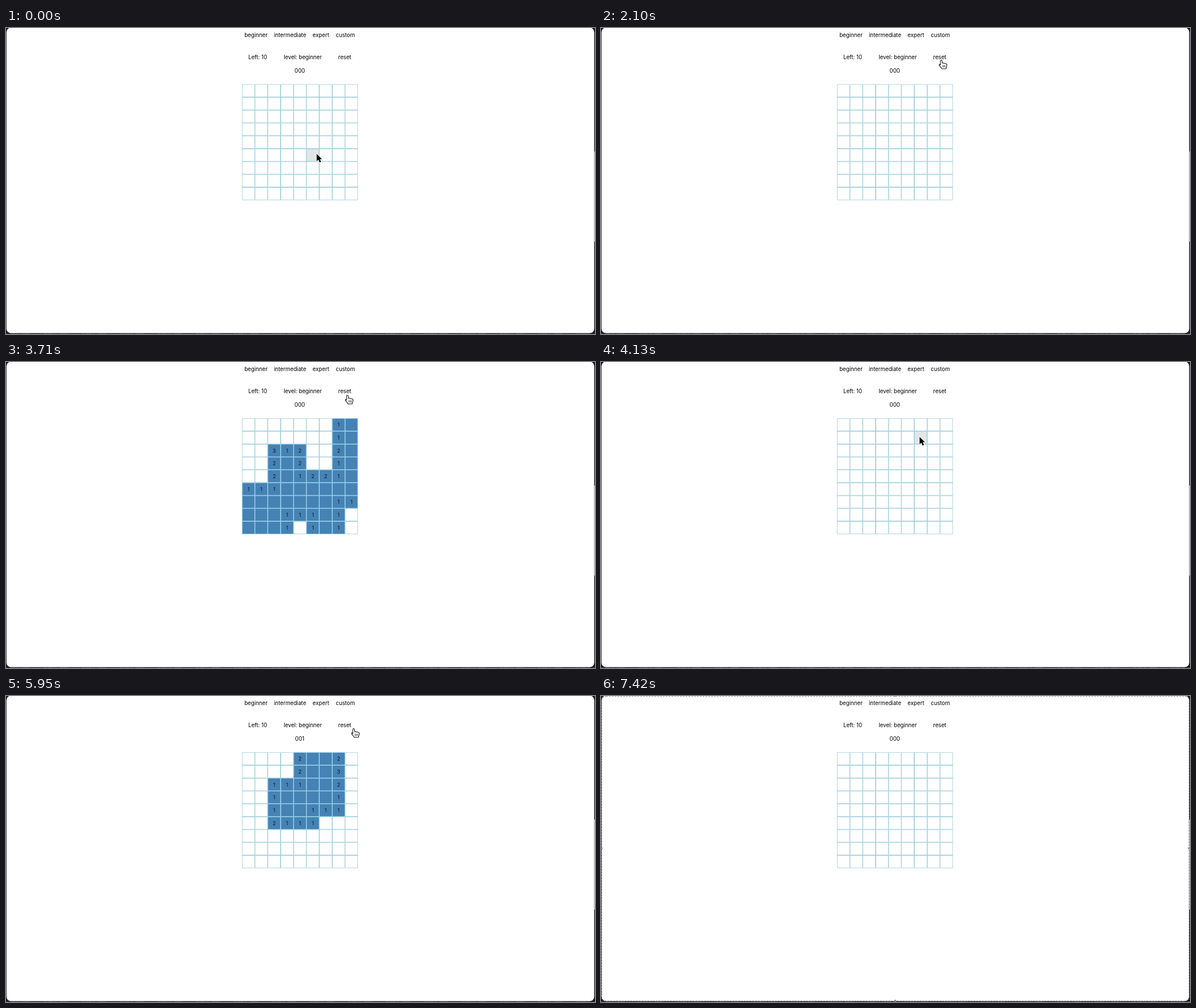
Recreate the animation shown at these times as an HTML page. Size 1038 by 540 pixels, loop 7560 ms.

```html
<!DOCTYPE html>
<html lang="en">
<head>
<meta charset="utf-8">
<title>Minesweeper</title>
<style>
  html, body { margin: 0; width: 100%; height: 100%; overflow: hidden; background: #1d1d22; }
  svg { display: block; width: 1038px; height: 540px; }
  text { font: 9.7px Inter, "Open Sans", sans-serif; text-anchor: middle; fill: #000; }
  #digits text { font-size: 9px; fill: #0c1a26; }
  #cells rect { fill: #fff; stroke: #9bcad9; stroke-width: .8; }
  #cells .hover { fill: #e2e6e6; }
  #cells .open { fill: #4682b4; stroke: #87c9e8; }
</style>
</head>
<body>
<svg viewBox="0 0 1038 540">
  <rect width="1038" height="540" fill="#1d1d22"/>
  <path d="M1037.4 218V377" stroke="#c9c9cb" stroke-width="1.2"/>
  <path d="M0 539.6H1038" stroke="#77777c" stroke-width=".7" stroke-dasharray="5 2 9 3 3 6 14 25" opacity=".5"/>
  <rect x=".9" y="-.6" width="1035.7" height="539.2" rx="8" fill="#fff"/>
  <g id="selection" fill="none">
    <rect x="1.2" y=".2" width="1035.2" height="538.1" rx="8" stroke="#66666c" stroke-dasharray="3 2"/>
    <g fill="#8b8b90">
      <circle cx="518.5" cy="-.6" r="2"/><circle cx="518.5" cy="538" r="2"/>
      <circle cx="1.2" cy="268.5" r="1.6"/><circle cx="1036" cy="268.5" r="1.6"/>
    </g>
  </g>
  <text x="440.5" y="15.6">beginner</text>
  <text x="500.5" y="15.6">intermediate</text>
  <text x="555" y="15.6">expert</text>
  <text x="598" y="15.6">custom</text>
  <text x="443.5" y="54.8">Left: 10</text>
  <text x="523" y="54.8">level: beginner</text>
  <text x="597" y="54.8">reset</text>
  <text id="timer" x="517.7" y="78.9">000</text>
  <g id="cells"></g>
  <g id="digits"></g>
  <g id="arrow" stroke-linejoin="round">
    <path d="M0 0V13L3 10.4L5.2 15.2L7.7 14.1L5.6 9.4H9.4Z" fill="#000" stroke="#fff" stroke-width="1.6" paint-order="stroke"/>
  </g>
  <g id="hand" stroke="#111" stroke-linejoin="round" stroke-linecap="round">
    <path d="M-.8 8.4V1.2Q-.8-.5.6-.5Q2-.5 2.2 1.2L2.7 5.2Q4.3 4.3 5.5 5.4Q7 4.8 8.1 6Q10.2 5.6 10.6 7.6L10 11.6L8.9 15H1.6L.4 12.8L-2.7 9.2Q-3.5 6.9-2.1 7.1Q-1.3 7.3-.8 8.4Z" fill="#fff" stroke-width="1.1"/>
    <path d="M3.2 8.8V12.2M5.3 8.8V12.2M7.4 8.8V12.2" stroke-width=".8" fill="none"/>
  </g>
</svg>
<script>
const LOOP = 7560, STEP = 70, SIZE = 9;
const LEFT = 415.9, TOP = 99.4, PITCH = 22.7, BORDER = 0.8;
const $ = id => document.getElementById(id);
const indices = [...Array(SIZE * SIZE).keys()];
const inside = n => n >= 0 && n < SIZE;

// Squares are written as row and column, "28" is row 2, column 8
const square = name => name[0] * SIZE + +name[1];
const rounds = [
  { from: 1050, to: 1890, click: "44", mines: "25 27 28 41 48 63 65 80 84 88" },
  { from: 3010, to: 3920, click: "43", mines: "11 12 16 25 31 35 36 41 78 84" },
  { from: 4480, to: 6090, click: "35", mines: "03 08 13 18 28 41 56 63 80 88" }
];

// Pointer moves: start, end and the place reached
const origin = { x: 547.5, y: 222 };
const moves = [
  { from: 420, to: 700, x: 517, y: 204 },
  { from: 1190, to: 1890, x: 599, y: 57 },
  { from: 2100, to: 2660, x: 494, y: 191 },
  { from: 3010, to: 3710, x: 601, y: 59 },
  { from: 3920, to: 4270, x: 540, y: 172 },
  { from: 4480, to: 4690, x: 608, y: 61 },
  { from: 4760, to: 5250, x: 612, y: 58 },
  { from: 6020, to: 6230, x: 648, y: 86 },
  { from: 6860, to: 7280, x: 612, y: 545 }
];

function neighbours(i) {
  const row = Math.floor(i / SIZE), col = i % SIZE;
  return indices.filter(j =>
    j !== i && Math.abs(Math.floor(j / SIZE) - row) <= 1 && Math.abs(j % SIZE - col) <= 1);
}

// Opens the clicked square and spreads through those without adjacent mines
function reveal({ click, mines }) {
  const mined = new Set(mines.split(" ").map(square));
  const counts = new Map();
  const queue = [square(click)];
  while (queue.length) {
    const i = queue.pop();
    if (counts.has(i)) continue;
    const around = neighbours(i);
    const count = around.filter(j => mined.has(j)).length;
    counts.set(i, count);
    if (!count) queue.push(...around);
  }
  return counts;
}
for (const round of rounds) round.counts = reveal(round);

function add(parent, name, attrs) {
  const node = document.createElementNS("http://www.w3.org/2000/svg", name);
  for (const key in attrs) node.setAttribute(key, attrs[key]);
  return parent.appendChild(node);
}

const cells = indices.map(i => {
  const x = LEFT + (i % SIZE) * PITCH, y = TOP + Math.floor(i / SIZE) * PITCH;
  const side = PITCH - BORDER;
  return {
    box: add($("cells"), "rect", { x: x + BORDER / 2, y: y + BORDER / 2, width: side, height: side }),
    digit: add($("digits"), "text", { x: x + PITCH / 2, y: y + 14.8 })
  };
});

const ease = k => k * k * (3 - 2 * k);

function pointerAt(t) {
  let { x, y } = origin;
  for (const move of moves) {
    if (t <= move.from) break;
    const k = ease(Math.min(1, (t - move.from) / (move.to - move.from)));
    x += (move.x - x) * k;
    y += (move.y - y) * k;
  }
  return { x, y };
}

function draw(t) {
  const { x, y } = pointerAt(t);
  const counts = rounds.find(r => t >= r.from && t < r.to)?.counts;
  const col = Math.floor((x - LEFT) / PITCH), row = Math.floor((y - TOP) / PITCH);
  const hovered = inside(col) && inside(row) ? row * SIZE + col : -1;
  cells.forEach(({ box, digit }, i) => {
    box.setAttribute("class", counts?.has(i) ? "open" : i === hovered ? "hover" : "");
    digit.textContent = counts?.get(i) || "";
  });

  const onReset = x > 583 && x < 614 && y > 44 && y < 60.5;
  for (const [id, shown] of [["arrow", !onReset], ["hand", onReset]]) {
    $(id).setAttribute("transform", `translate(${x} ${y})`);
    $(id).setAttribute("visibility", shown ? "visible" : "hidden");
  }
  $("timer").textContent = t >= 5530 && t < 6090 ? "001" : "000";
  $("selection").setAttribute("opacity", t < 6650 ? 0 : t < 6720 ? 0.5 : 1);
}

const start = performance.now();
function tick() {
  const t = (performance.now() - start) % LOOP;
  draw(Math.floor(t / STEP) * STEP);
  requestAnimationFrame(tick);
}
tick();
</script>
</body>
</html>
```
